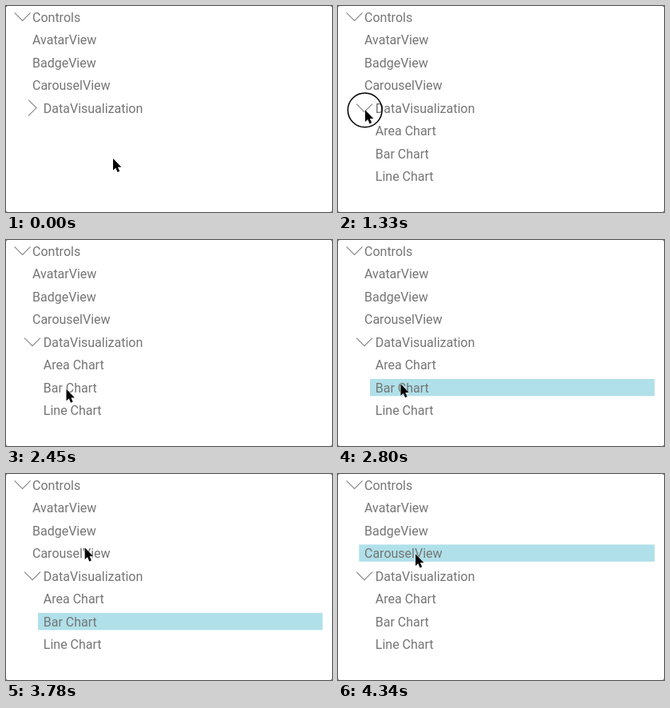
Recreate the animation shown at these times as an HTML page. Size 408x258 px, loop 4410 ms.

```html
<!DOCTYPE html>
<html lang="en">
<head>
<meta charset="utf-8">
<title>Tree view</title>
<style>
  html, body { margin: 0; width: 100%; height: 100%; overflow: hidden; background: #fff; }
  svg { display: block; width: 408px; height: 258px; }
  text { font: 16px Roboto, Arial, sans-serif; fill: #757575; }
  .chevron { fill: none; stroke: #858585; stroke-width: 1.1; }
</style>
</head>
<body>
<svg viewBox="0 0 408 258">
  <path fill="#666" d="M0 0H2.5Q0 0 0 2.5ZM408 0V2.5Q408 0 405.5 0ZM0 258V255.5Q0 258 2.5 258ZM408 258H405.5Q408 258 408 255.5Z"/>
  <rect id="mark" height="21.4" fill="#b0e0e9"/>
  <g id="rows"></g>
  <path class="chevron" d="M-5-10L5 0L-5 10" transform="translate(20.6 13.4) rotate(90)"/>
  <path class="chevron" id="chevron" d="M-5-10L5 0L-5 10"/>
  <circle id="ring" r="21.4" fill="none" stroke="#000" stroke-width="1.5"/>
  <path id="cursor" d="M0 0V14.8L3.3 11.7L5.6 17.1L8.2 16L5.9 10.7H10.4Z" stroke="#fff" stroke-width="1" paint-order="stroke"/>
</svg>
<script>
const LOOP = 4410, STEP = 70, PITCH = 28.55;
const NS = 'http://www.w3.org/2000/svg';
const get = id => document.getElementById(id);
const [mark, rows, chevron, ring, cursor] = ['mark', 'rows', 'chevron', 'ring', 'cursor'].map(get);

const labels = ['Controls', 'AvatarView', 'BadgeView', 'CarouselView',
  'DataVisualization', 'Area Chart', 'Bar Chart', 'Line Chart'];
const texts = labels.map((label, i) => {
  const el = document.createElementNS(NS, 'text');
  el.textContent = label;
  el.setAttribute('x', i < 4 ? 33 : 46.8);
  el.setAttribute('y', 19.5 + PITCH * i);
  return rows.appendChild(el);
});

// time, x, y of the pointer tip
const path = [
  [0, 134, 191], [70, 78, 84], [140, 30.5, 19.5], [210, 34, 130.3],
  [2030, 34, 130.3], [2240, 75.5, 186.7], [2730, 75.5, 186.7],
  [3220, 96, 141.5], [3570, 98.7, 92.3], [4270, 98.7, 92.3], [4340, 97, 100.3]
];
const clicks = [[350, 490], [1330, 1470], [1820, 1960], [2310, 2450], [3640, 3780]];

const within = (t, a, b) => t >= a && t < b;
const show = (el, on) => el.setAttribute('visibility', on ? 'visible' : 'hidden');
const place = (el, x, y, extra = '') => el.setAttribute('transform', `translate(${x} ${y}) ${extra}`);

function pointer(t) {
  const i = path.findIndex(k => k[0] > t);
  if (i < 0) return path[path.length - 1].slice(1);
  const [t0, x0, y0] = path[i - 1], [t1, x1, y1] = path[i];
  const p = (t - t0) / (t1 - t0);
  return [x0 + (x1 - x0) * p, y0 + (y1 - y0) * p];
}

function angle(t) {
  if (t < 350 || within(t, 1400, 1820)) return 0;
  const p = Math.min(1, (t - (t < 1400 ? 350 : 1820)) / 490);
  return 90 * (1 - (1 - p) ** 3);
}

function select(row) {
  show(mark, row > 0);
  if (row < 0) return;
  const x = row < 4 ? 26.3 : 40;
  mark.setAttribute('x', x);
  mark.setAttribute('y', 2.7 + PITCH * row);
  mark.setAttribute('width', 396.3 - x);
}

function draw(time) {
  const t = Math.floor((time % LOOP) / STEP) * STEP;
  const [x, y] = pointer(t);
  const open = within(t, 420, 1400) || t >= 1890;
  texts.slice(5).forEach(el => show(el, open));
  place(chevron, 33, 127.6, `rotate(${angle(t)})`);
  select(t < 2730 ? -1 : t < 4060 ? 6 : 3);
  place(cursor, x, y);
  place(ring, x - .3, y);
  show(ring, clicks.some(([a, b]) => within(t, a, b)));
}

let start;
function tick(now) {
  start ??= now;
  draw(now - start);
  requestAnimationFrame(tick);
}
draw(0);
requestAnimationFrame(tick);
</script>
</body>
</html>
```
